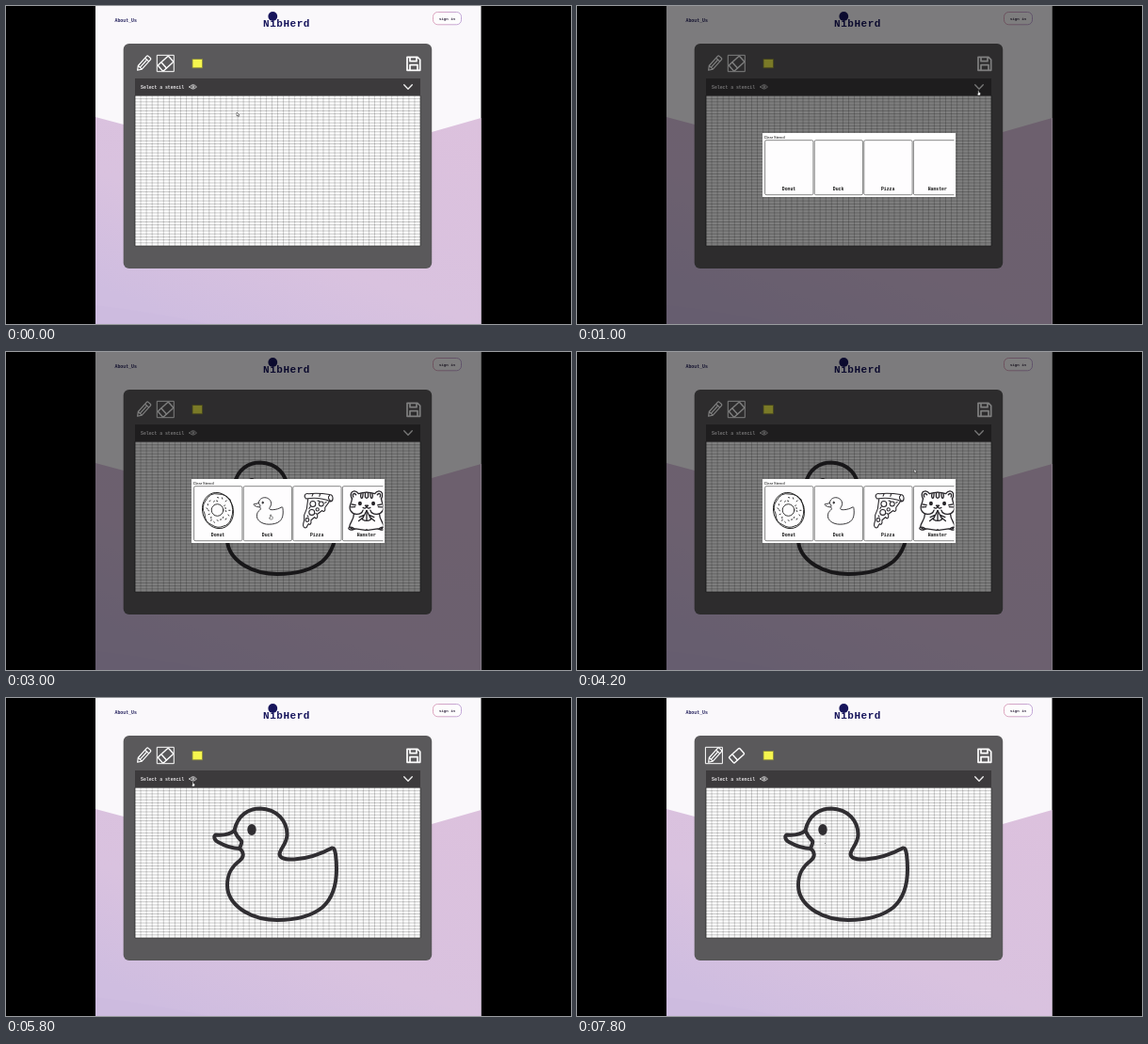
Animation of 600 by 338 pixels, one loop 8 s. Source, as an HTML page:

```html
<!DOCTYPE html>
<html lang="en">
<head>
<meta charset="utf-8">
<title>Stencil drawing board</title>
<style>
html, body { margin: 0; width: 100%; height: 100%; overflow: hidden; background: #000; }
svg { display: block; width: 100vw; height: 100vh; }
text { font-family: "Liberation Mono", "Courier New", monospace; font-weight: bold; }
.line { fill: none; stroke-linecap: round; stroke-linejoin: round; }
</style>
</head>
<body>
<svg viewBox="0 0 600 338">
  <defs>
    <linearGradient id="lilac" x1="1" y1="0" x2="0.25" y2="1">
      <stop offset="0" stop-color="#dcc1dd"/>
      <stop offset=".65" stop-color="#d9c2df"/>
      <stop offset="1" stop-color="#cfbde0"/>
    </linearGradient>
    <linearGradient id="rim"><stop offset="0" stop-color="#d58fae"/><stop offset="1" stop-color="#b391cf"/></linearGradient>
    <clipPath id="boardClip"><rect x="137" y="95" width="303" height="160"/></clipPath>
    <clipPath id="modalClip"><rect x="197" y="135" width="203.5" height="68"/></clipPath>

    <g id="duck" class="line" stroke="#302e32" stroke-width="4">
      <path d="M242.500 141C246 124 258 117.500 270 117.500C288 118 298.500 131 298.500 145C298.500 155 291 160 290.500 166C291 171 297 172 306 171.500C322 170.500 334 166 346 159.500C349 159 349 162 350 166C353.500 194 348 212 336 222.500C323 233 306 236 288 236C258 236 235 219 235 199C235 186 240 179 248 173C253 169 253 164 248 160"/>
      <path d="M242.500 141C238 145 230 146 223 145.500C220 146 221 151 225 153C232 157 240 160 248 160C249 157 251 154 250 152C247 149 244 145 242.500 141"/>
      <ellipse cx="261" cy="140" rx="2.700" ry="3.900" fill="#302e32"/>
    </g>

    <g id="hamsterHalf">
      <path d="M232 129C221 109 230 96 242 97C250 98 255 103 258 108Q274 102 291 102"/>
      <path d="M237 121C231 108 240 103 248 112"/>
      <path d="M232 127C230 140 229 143 225 152C218 170 228 188 249 191C262 192 272 186 276 175"/>
      <path d="M239 191C239 216 222 224 221 243Q234 256 246 250Q291 258 291 254"/>
      <path d="M219 251C215 246 222 241 231 244C240 247 243 251 238 253C230 256 223 255 219 251Z"/>
      <path d="M268 107C264 122 270 129 274 124Q276 119 276 107"/>
      <path d="M230 151L246 154M228 162L244 161M291 160Q285 172 276 164"/>
      <path d="M291 176L273 211M282 194L261 203M277 204L259 218"/>
      <ellipse cx="264" cy="147" rx="5" ry="6" fill="#28262a"/>
    </g>
    <g id="hamster" class="line" stroke="#28262a" stroke-width="5">
      <use href="#hamsterHalf"/>
      <use href="#hamsterHalf" transform="translate(582 0) scale(-1 1)"/>
      <path d="M285 104V121Q291 130 297 121V104M285 156H297L291 161ZM291 178V215M273 211Q291 224 309 211"/>
    </g>

    <g id="pizza" class="line" stroke="#28262a" stroke-width="4">
      <path d="M241 130C229 120 236 107 250 110Q288 106 333 113C348 114 350 137 337 141Q292 121 241 130Z"/>
      <path d="M333 116Q322 126 337 139M268 110L264 119M296 110L293 120"/>
      <path d="M248 131L243 169L233 194V216Q229 226 229 235Q232 247 242 243L250 228Q256 236 260 224V214L274 202Q280 212 285 202V190L304 176Q310 184 315 174V164L331 142"/>
      <circle cx="267" cy="150" r="11"/><circle cx="300" cy="150" r="9"/>
      <circle cx="263" cy="183" r="11"/><circle cx="285" cy="172" r="6"/><circle cx="245" cy="213" r="7"/>
      <path d="M252 168l5 -6M286 137l7 2M246 196l3 5M315 146l5 -4M278 187l5 3"/>
    </g>

    <g id="donut" class="line" stroke="#222" stroke-width=".9">
      <ellipse cx="225" cy="168.500" rx="16.300" ry="19.300" transform="rotate(-16 225 168.500)"/>
      <path d="M238 157Q243 168 239 177Q237 184 231 185Q225 188 219 184Q211 181 211 172Q207 165 212 158Q217 149 225 151Q234 151 238 157Z"/>
      <circle cx="224.500" cy="168" r="6.300"/>
      <path id="sprinkles"/>
    </g>
  </defs>

  <rect x="95" width="409.500" height="338" fill="#faf8fb"/>
  <path d="M95 118L125 126Q290 172 452 134L504.500 119V338H95Z" fill="url(#lilac)"/>
  <path d="M95 318Q150 324 215 338H95Z" fill="#cbb9df" opacity=".5"/>

  <text x="115.500" y="17" font-size="4.900" fill="#26235f">About_Us</text>
  <text x="273" y="21.500" font-size="11" letter-spacing=".54" fill="#17155c">NibHerd</text>
  <circle cx="283.300" cy="11" r="4.900" fill="#17155c"/>
  <rect x="453.500" y="6.500" width="30" height="13.300" rx="5" fill="#fdfcfd" stroke="url(#rim)" stroke-width=".8"/>
  <text x="460" y="14.800" font-size="4.050" fill="#3a3048">Sign in</text>

  <rect x="124.700" y="40" width="327.500" height="239" rx="6" fill="#5a595b"/>

  <g class="line" stroke="#fff" stroke-width="1.200">
    <g transform="translate(146 61.200) rotate(-48)">
      <path d="M-9.500 0L-5.500 -2.700H8Q9.300 -2.700 9.300 -1.400V1.400Q9.300 2.700 8 2.700H-5.500ZM-5.500 -2.700V2.700M5.500 -2.700V2.700M-5 0H5"/>
    </g>
    <g transform="translate(169.500 61.200) rotate(-42)" stroke-width="1.400">
      <rect x="-7.500" y="-4.200" width="15" height="8.400" rx="1"/><path d="M-2.500 -4.200V4.200"/>
    </g>
    <rect id="toolBox" y="52.300" width="17.600" height="17.400" stroke-width="1"/>
    <path d="M426 54.300H437L439.700 57V68.300H426ZM429 54.300V58.700H436V54.300M429 68V62.700H437V68" stroke-width="1.700"/>
  </g>
  <rect x="198" y="56.500" width="10.500" height="9.300" fill="#f6f64e" stroke="#8b8b3a" stroke-width=".8"/>

  <rect x="137" y="77" width="303" height="18.500" fill="#3c3a3c"/>
  <text x="143" y="87.600" font-size="4.800" fill="#e6e4e6">Select a stencil</text>
  <g class="line" stroke="#eee" stroke-width=".8">
    <path d="M194.800 86Q198.600 81.300 202.400 86Q198.600 90.300 194.800 86Z"/>
    <circle cx="198.600" cy="85.900" r="1.100"/>
    <path d="M422.700 83.700L427 88.300L431.300 83.700" stroke-width="1.300"/>
  </g>

  <rect x="137" y="95.500" width="303" height="159.500" fill="#fff"/>
  <path id="rows" stroke="#000" stroke-opacity=".3" stroke-width=".75"/>
  <path id="columns" stroke="#000" stroke-opacity=".25" stroke-width=".75"/>
  <path d="M137 95V255H440V95" fill="none" stroke="#333" stroke-width=".7"/>
  <g clip-path="url(#boardClip)"><use id="stencil"/></g>

  <g id="modal">
    <rect x="95" width="409.500" height="338" opacity=".5"/>
    <rect x="197" y="135" width="205" height="68" fill="#fff"/>
    <text x="198.700" y="141" font-size="3.900" style="font-family:'Liberation Sans',Arial,sans-serif;font-weight:normal">Clear Stencil</text>
    <g clip-path="url(#modalClip)">
      <g id="cards" fill="#fefdfe" stroke="#555" stroke-width=".7"></g>
      <g id="thumbs">
        <use href="#donut"/>
        <use href="#duck" transform="translate(278.500 169) scale(.24) translate(-285.500 -177)"/>
        <use href="#pizza" transform="translate(331.500 168.500) scale(.27) translate(-288 -176)"/>
        <use href="#hamster" transform="translate(383 168.500) scale(.262) translate(-291 -176)"/>
      </g>
    </g>
    <g id="labels" font-size="4.800" text-anchor="middle" fill="#111"></g>
  </g>

  <g id="cursor" stroke="#222" stroke-width=".5" stroke-linejoin="round" fill="#fff">
    <path id="arrow" d="M0 0V3.900L1 3.100L1.700 4.600L2.400 4.300L1.800 2.900H3Z"/>
    <path id="hand" d="M-.4 0Q.2 -.6 .6 0V1.700L2.200 2.200V4L1.600 5H-.5L-1.600 3.300L-.4 3.400Z"/>
    <circle id="dot" r=".5" fill="#777" stroke="none"/>
  </g>
</svg>
<script>
const LOOP = 8000, STEP = 200;
const $ = id => document.getElementById(id);
const repeat = (n, fn) => Array.from({ length: n }, (_, i) => fn(i)).join("");

$("rows").setAttribute("d", repeat(50, i => `M137 ${95.5 + i * 3.19}H440`));
$("columns").setAttribute("d", repeat(50, i => `M${137 + i * 6.06} 95.5V255`));
$("sprinkles").setAttribute("d", repeat(22, i => {
  const angle = i * 2.4, r = i % 2 ? 9.2 : 12;
  const x = 224.7 + r * Math.cos(angle), y = 168.3 + r * 1.12 * Math.sin(angle);
  return `M${x} ${y}l${1.3 * Math.cos(i * 1.7)} ${1.3 * Math.sin(i * 1.7)}`;
}));

const cardNames = ["Donut", "Duck", "Pizza", "Hamster"];
$("cards").innerHTML = repeat(4, i =>
  `<rect x="${199.6 + i * 52.6}" y="142.700" width="51.300" height="58" rx="1.500"/>`);
$("labels").innerHTML = repeat(4, i => `<text x="${225 + i * 52.6}" y="196.400">${cardNames[i]}</text>`);

// Pointer stops: time, x, y
const pointer = [
  [0, 245, 113], [200, 250, 112], [800, 426, 90], [1200, 426.5, 90], [1800, 383, 172],
  [2000, 380, 173], [2200, 341, 173], [2400, 338, 174], [2600, 281, 173], [3200, 281, 173],
  [4200, 358, 124.5], [4400, 379.5, 87], [5000, 198, 89], [6200, 198.5, 89],
  [6800, 146, 62], [7000, 148, 63], [7400, 262, 146], [7600, 262, 165], [7800, 263.5, 154.5]
];

function pointerAt(t) {
  const next = pointer.findIndex(p => p[0] > t);
  if (next < 0) return pointer[pointer.length - 1].slice(1);
  const [t0, x0, y0] = pointer[next - 1], [t1, x1, y1] = pointer[next];
  const k = (t - t0) / (t1 - t0), e = k * k * (3 - 2 * k);
  return [x0 + (x1 - x0) * e, y0 + (y1 - y0) * e];
}

function stencilAt(t) {
  if (t < 1800 || (t >= 5200 && t < 5800)) return "";
  return t < 2400 ? "#hamster" : t < 3000 ? "#pizza" : "#duck";
}

const within = (t, a, b) => t >= a && t < b;
const show = (id, on) => $(id).setAttribute("visibility", on ? "visible" : "hidden");

function render(time) {
  const t = Math.floor((time % LOOP) / STEP) * STEP;
  const [x, y] = pointerAt(t);
  const stencil = stencilAt(t), open = within(t, 1000, 4400);
  $("stencil").setAttribute("href", stencil || "#none");
  show("modal", open);
  show("thumbs", open && t >= 1200);
  $("toolBox").setAttribute("x", t < 6800 ? 160.7 : 136.8);

  const hand = within(t, 800, 1400) || within(t, 1800, 3400) || within(t, 5000, 6400) || within(t, 6800, 7200);
  const drawing = t >= 7400;
  $("cursor").setAttribute("transform", `translate(${x} ${y})`);
  show("hand", hand);
  show("dot", drawing);
  show("arrow", !hand && !drawing);
}

const start = performance.now();
function tick() {
  render(performance.now() - start);
  requestAnimationFrame(tick);
}
tick();
</script>
</body>
</html>
```
